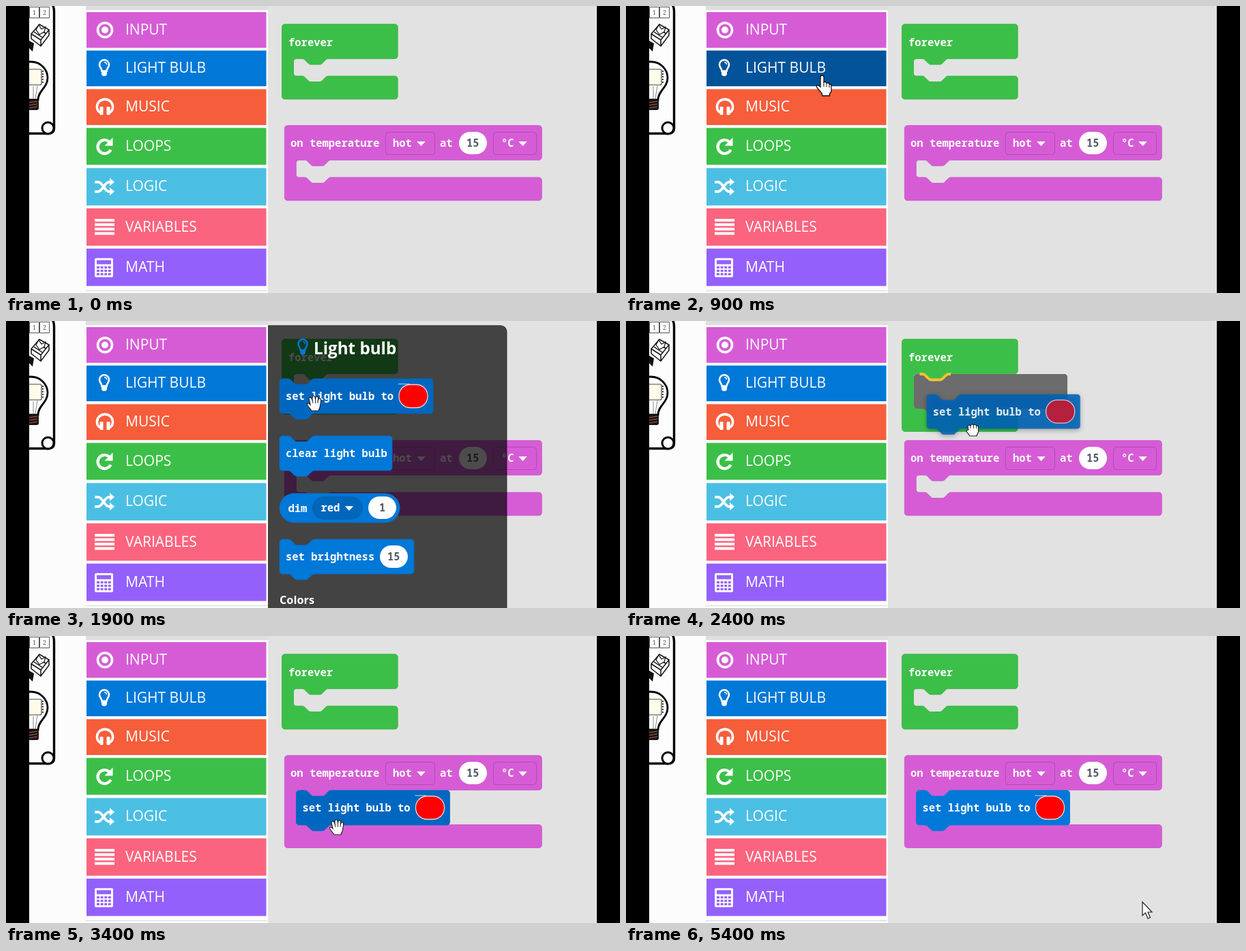
These frames come from a looping animation (900 px wide and 422 px high, 6500 ms). An HTML page with a canvas:

```html
<!DOCTYPE html>
<html lang="en">
<head>
<meta charset="utf-8">
<title>Block editor</title>
<style>
html, body { margin: 0; width: 100%; height: 100%; overflow: hidden; background: #000; }
canvas { display: block; width: 900px; height: 422px; }
</style>
</head>
<body>
<canvas id="stage" width="900" height="422"></canvas>
<script>
const ctx = document.getElementById('stage').getContext('2d');
const LOOP = 6500, STEP = 100, UNIT = 1.06;
const SANS = '"Open Sans", "Noto Sans", sans-serif';
const MONO = 'bold 15.5px "Noto Sans Mono", "DejaVu Sans Mono", monospace';
const BLUE = '#0078d7', ACTIVE_BLUE = '#0067c0', BLUE_EDGE = '#0a6cc4';
const GREEN = '#3cbf48', PURPLE = '#d65cd6', WORKSPACE = '#e2e2e2';

const rows = [
  ['INPUT', PURPLE, 9, 52.5], ['LIGHT BULB', BLUE, 65.5, 52.5], ['MUSIC', '#f65d3b', 122.3, 52.7],
  ['LOOPS', GREEN, 179.3, 54.2], ['LOGIC', '#4bbfe3', 238.3, 55],
  ['VARIABLES', '#fb647e', 297.5, 55], ['MATH', '#9460fb', 356.7, 55]
];

// Keys are [time, x, y].
const pointerKeys = [
  [100, 786, 397], [300, 745, 315], [500, 685, 200], [700, 612, 122], [800, 425, 110], [900, 290, 115],
  [1500, 290, 115], [1600, 318, 116], [1900, 452, 121], [2200, 452, 121], [2300, 466, 131],
  [2400, 508, 160], [2600, 510, 205], [2800, 496, 264], [2900, 491, 278], [3100, 485, 281],
  [3700, 485, 281], [3900, 560, 312], [4100, 700, 373], [4300, 757, 391]
];
const dragKeys = [
  [2300, 411, 92], [2400, 440.7, 107.7], [2600, 468, 154], [2800, 457, 214], [2900, 453.7, 227.3], [3100, 446, 230]
];

function at(keys, t) {
  if (t <= keys[0][0]) return keys[0].slice(1);
  for (let i = 1; i < keys.length; i++) {
    const [t0, x0, y0] = keys[i - 1], [t1, x1, y1] = keys[i];
    if (t <= t1) {
      const k = (t - t0) / (t1 - t0);
      return [x0 + (x1 - x0) * k, y0 + (y1 - y0) * k];
    }
  }
  return keys[keys.length - 1].slice(1);
}

function rect(x, y, w, h, color) {
  ctx.fillStyle = color;
  ctx.fillRect(x, y, w, h);
}

function rounded(x, y, w, h, r, fill, line, width = 1) {
  ctx.beginPath();
  ctx.roundRect(x, y, w, h, r);
  paint(fill, line, width);
}

function paint(fill, line, width = 1, path) {
  if (fill) { ctx.fillStyle = fill; path ? ctx.fill(path) : ctx.fill(); }
  if (line) {
    ctx.strokeStyle = line;
    ctx.lineWidth = width;
    path ? ctx.stroke(path) : ctx.stroke();
  }
}

function shape(x, y, d, fill, line, width, scale = 1) {
  ctx.save();
  ctx.translate(x, y);
  ctx.scale(scale, scale);
  paint(fill, line, width, new Path2D(d));
  ctx.restore();
}

function text(str, x, y, font = MONO, color = '#fff') {
  ctx.font = font;
  ctx.fillStyle = color;
  ctx.fillText(str, x, y);
}

// Block outlines, in editor units.
const NOTCH = 'c2,0 3,1 4,2 l4,4 c1,1 2,2 4,2 h12 c2,0 3,-1 4,-2 l4,-4 c1,-1 2,-2 4,-2 ';
const TAB = 'c-2,0 -3,1 -4,2 l-4,4 c-1,1 -2,2 -4,2 h-12 c-2,0 -3,-1 -4,-2 l-4,-4 c-1,-1 -2,-2 -4,-2 ';
const arc = (dx, dy, sweep = 1) => `a4,4 0 0 ${sweep} ${dx},${dy} `;

function statement(x, y, width, fill, line) {
  const w = width / UNIT;
  shape(x, y, 'M0,4 ' + arc(4, -4) + 'H12 ' + NOTCH + `H${w - 4} ` + arc(4, 4) + 'V44 ' + arc(-4, 4) +
    'H48 ' + TAB + 'H4 ' + arc(-4, -4) + 'z', fill, line, .8, UNIT);
}

function container(x, y, width, open, fill, line) {
  const w = width / UNIT, foot = open ? 96 : 72;
  shape(x, y, 'M0,4 ' + arc(4, -4) + `H${w - 4} ` + arc(4, 4) + 'V44 ' + arc(-4, 4) + 'H64 ' + TAB +
    'H20 ' + arc(-4, 4, 0) + `V${foot - 4} ` + arc(4, 4, 0) + 'H28 ' + NOTCH + `H${w - 4} ` + arc(4, 4) +
    `V${foot + 28} ` + arc(-4, 4) + 'H4 ' + arc(-4, -4) + 'z', fill, line, .8, UNIT);
}

function dropdown(x, y, w, label, labelX, arrowX, line, r = 4, fill = null) {
  rounded(x + .5, y + .5, w, 33, r, fill, line);
  text(label, labelX, y + 21.5);
  shape(arrowX, y + 15, 'M-4.5,0 H4.5 L0,5 z', '#fff', '#fff', 1.5);
}

function numberField(x, y, value, labelX) {
  rounded(x, y, 41, 33, 16.5, '#fff');
  text(value, labelX, y + 21.5, MONO, '#575e68');
}

function bulbLabel(x, y, swatch) {
  text('set light bulb to', x + 9, y + 31);
  rounded(x + 175, y + 8.5, 42, 34, 16.5, swatch, '#e6d5dc', 1.3);
}

function bulbBlock(x, y, fill) {
  statement(x, y, 225, fill, fill);
  bulbLabel(x, y, '#f00');
  rect(x + 174, y + 7, 17, 1.2, '#9cc4e6');
}

function draggedBlock(x, y) {
  ctx.save();
  ctx.globalAlpha = .88;
  ctx.shadowColor = 'rgba(0,0,0,.35)';
  ctx.shadowBlur = 7;
  ctx.shadowOffsetY = 2;
  statement(x, y, 225, '#0063b8');
  ctx.shadowColor = 'transparent';
  bulbLabel(x, y, '#cc162c');
  ctx.restore();
}

function placeholder(x, y) {
  statement(x, y, 225, '#6c6c6c');
  shape(x, y, 'M8,0 H12 ' + NOTCH + 'H51', null, '#f8c230', 3.6, UNIT);
}

function bulbIcon(x, y, color, scale = 1) {
  shape(x, y, 'M-3.5,5 C-3.5,1 -7,0 -7,-4.5 A7,7 0 0 1 7,-4.5 C7,0 3.5,1 3.5,5 z', null, color, 2.6, scale);
  shape(x, y, 'M-4,4 H4 V9 Q4,12 0,12.5 Q-4,12 -4,9 z', color, null, 1, scale);
  shape(x, y, 'M0,-8 Q3.5,-8 3.5,-4.5', null, color, 1.6, scale);
}

const icons = [
  y => {
    shape(145, y, 'M-10.5,0 a10.5,10.5 0 1 0 21,0 a10.5,10.5 0 1 0 -21,0', null, '#fff', 3.6);
    shape(145, y, 'M-5,0 a5,5 0 1 0 10,0 a5,5 0 1 0 -10,0', '#fff');
  },
  y => bulbIcon(144, y - 1, '#fff'),
  y => {
    shape(145, y, 'M-7,8 Q-12,5 -11.5,-1 A11.5,10.5 0 0 1 11.5,-1 Q12,5 7,8', null, '#fff', 3.6);
    shape(145, y, 'M-7,0 h4 v11 h-4 z M3,0 h4 v11 h-4 z', '#fff', '#fff', 1);
  },
  y => {
    shape(144, y, 'M7,-7 A10,10 0 1 0 9.5,5', null, '#fff', 4.2);
    shape(144, y, 'M12.5,-13 V-1 H.5 z', '#fff');
  },
  y => {
    shape(144, y, 'M-14,-7 H-9 C-2,-7 0,7 7,7 H10 M-14,7 H-9 C-2,7 0,-7 7,-7 H10', null, '#fff', 3.8);
    shape(144, y, 'M8,-13 L15,-7 L8,-1 z M8,1 L15,7 L8,13 z', '#fff');
  },
  y => { for (let i = 0; i < 4; i++) rect(130, y - 12 + i * 6.5, 29, 4, '#fff'); },
  (y, color) => {
    rounded(130, y - 13.5, 27, 28, 2, '#fff');
    rect(133, y - 10.5, 21, 6, color);
    for (let i = 0; i < 12; i++) rect(133 + i % 4 * 5.6, y - 1.5 + (i >> 2) * 5, 4, 3.2, color);
  }
];

function card() {
  ctx.save();
  ctx.beginPath();
  ctx.rect(34, 0, 45, 200);
  ctx.clip();
  shape(0, 0, 'M30,-5 H66 Q70.5,0 70.5,8 V180 Q70.5,187 62,187.5 H30', '#fdfdfd', '#000', 3.4);
  shape(61.5, 179.5, 'M-8.5,0 a8.5,8.5 0 1 0 17,0 a8.5,8.5 0 1 0 -17,0', '#fff', '#000', 3);
  for (const [n, x] of [['1', 34.5], ['2', 49.5]]) {
    rounded(x, 1.5, 14, 16, 0, '#fff', '#555');
    text(n, x + 4.5, 13, '9px "Noto Serif", serif', '#555');
  }
  shape(0, 0, 'M37,41 L49,27 L63,35 L51,50 z M37,41 V48 L51,59 L63,43 V35 M51,50 V59 M41,38 L53,46 M45,33 L58,40', '#fff', '#111', 1.5);
  shape(0, 0, 'M44,35 l4,-7 4,6 6,-3 -2,7 -7,4 z', '#fff', '#111', 1.2);
  shape(0, 0, 'M34,51 L41,55 L39,67 L34,62 z', '#111');
  shape(0, 0, 'M47,138 C47,124 61,121 61,105 A24,24 0 0 0 37,82 H30 V138 z', '#fff', '#000', 2.8);
  rounded(30, 93, 22, 23, 2, '#fffbea', '#444', 1.2);
  for (let i = 0; i < 5; i++) rect(53, 95 + i * 4, 2, 2, '#444');
  shape(0, 0, 'M40,118 V136 M46,117 L43,136', null, '#888', 1);
  rounded(30, 138, 18, 15, 3, '#171717');
  for (let i = 0; i < 3; i++) shape(34, 142 + i * 4, 'M0,0 L12,-2', null, '#b85a45', 1.1);
  ctx.restore();
}

function toolbox(hover) {
  rect(117, 0, 267, 6, '#dedede');
  rect(117, 6, 267, 416, '#fcfcfc');
  rect(117, 418, 266, 1.2, '#d9d9e4');
  rows.forEach(([label, color, y, h], i) => {
    rect(118, y, 263.5, h, hover && i === 1 ? '#02539a' : color);
    icons[i](y + h / 2, color);
    text(label, 175, y + h / 2 + 6.5, '500 21px ' + SANS);
  });
}

function forever(open) {
  container(404.5, 26.7, 169.7, open, GREEN, '#38b344');
  text('forever', 414, 58.5);
}

function temperature(open) {
  container(408.3, 175.7, 377, open, PURPLE, '#c956c9');
  text('on temperature', 417, 206.5);
  dropdown(556, 185, 72, 'hot', 567, 608.5, '#b14bb1');
  text('at', 636, 206.5);
  numberField(664, 185, '15', 675);
  dropdown(714, 185, 63, '°C', 726, 757.5, '#b14bb1');
}

function flyout() {
  rounded(384.5, 6.7, 349.5, 425, [0, 9, 0, 0], 'rgba(0,0,0,.7)', 'rgba(0,0,0,.6)');
  bulbIcon(435, 38, BLUE, .95);
  text('Light bulb', 451, 49, 'bold 24.2px ' + SANS);
  bulbBlock(401, 85, ACTIVE_BLUE);
  statement(401, 169, 165, BLUE, BLUE_EDGE);
  text('clear light bulb', 410, 200);
  rounded(401, 253.7, 176, 42.5, 21, BLUE, BLUE_EDGE);
  text('dim', 413.5, 280.5);
  dropdown(449, 258, 73, 'red', 461.5, 503, '#0a62b0', 16.5, '#0067bb');
  numberField(531, 258, '1', 547);
  statement(401, 321, 197, BLUE, BLUE_EDGE);
  text('set brightness', 410, 351.5);
  numberField(548, 330, '15', 559);
  text('Colors', 401, 416, 'bold 16.3px ' + SANS);
}

const cursors = {
  arrow: (x, y) => shape(x, y, 'M0,0 V20 L4.5,16 L8,24.5 L11.5,23 L8,15 H14 z', '#fff', '#222', 1.2),
  point: (x, y) => {
    shape(x, y, 'M-5,-10 Q-5,-13 -2.5,-13 Q0,-13 0,-10 V-3 Q2.5,-4.5 4,-1.5 Q7,-3 8,0 Q11,-.5 11,3 V9 Q11,12 8.5,14 V17 H-2.5 V14 L-10,5 Q-12,2 -9,1.5 Q-7,1.5 -5,4 z',
      '#fff', '#111', 1.3);
    shape(x, y, 'M0,-3 V4 M4,-1 V4 M8,0 V5', null, '#111', 1);
  },
  hand: (x, y) => {
    shape(x, y, 'M-6,2 L-8,-6 Q-8,-8.5 -6,-8.5 Q-4.5,-8.5 -3,-5 Q-3.5,-11 -1,-11 Q1,-11 1.5,-6 Q2,-10.5 4,-10 Q6,-9.5 5.5,-5 Q7,-8 8.5,-7 Q10,-6 9.5,-2 L8,6 Q7,8 6,11 H-4 L-10,3 Q-11.5,0 -9,0 Q-8,0 -6,2 z',
      '#fff', '#222', 1.2);
    shape(x, y, 'M-3,-5 L-2,0 M1.5,-6 V0 M5.5,-5 L5,0', null, '#222', .9);
  },
  grab: (x, y) => {
    shape(x, y, 'M-6,0 L-7,-5 Q-6,-8 -3,-6 Q-1,-9.5 1.5,-7 Q4,-9 5.5,-6 Q8.5,-7 8.5,-3 V3 Q7,6 6,9 H-4 L-8.5,3 Q-9.5,0 -6,0 z',
      '#fff', '#222', 1.2);
    shape(x, y, 'M-3,-6 V-2 M1.5,-7 V-2 M5.5,-6 V-2', null, '#222', .9);
  }
};

function pointerKind(t) {
  if (t < 900) return 'arrow';
  if (t < 1700) return 'point';
  if (t < 2300) return 'hand';
  if (t < 3300) return 'grab';
  return t < 3900 ? 'hand' : 'arrow';
}

function draw(t) {
  const dragging = t >= 2300 && t < 3300;
  const dropped = t >= 3300;
  const overForever = t >= 2400 && t < 2600;
  const overTemperature = dragging && t >= 2700;

  rect(0, 0, 900, 422, '#000');
  rect(34, 0, 832, 422, '#fcfcfc');
  rect(383, 0, 483, 422, WORKSPACE);
  card();
  toolbox(t >= 900 && t < 1300);

  forever(overForever);
  if (overForever) placeholder(422, 78);
  temperature(overTemperature || dropped);
  if (overTemperature) placeholder(425.5, 227);
  if (dropped) bulbBlock(425.5, 227, t < 4800 ? ACTIVE_BLUE : BLUE);
  if (t >= 1300 && t < 2300) flyout();
  if (dragging) draggedBlock(...at(dragKeys, t));
  if (t >= 100) cursors[pointerKind(t)](...at(pointerKeys, t));
}

const start = performance.now();
function frame() {
  const t = (performance.now() - start) % LOOP;
  draw(Math.floor(t / STEP) * STEP);
  requestAnimationFrame(frame);
}
frame();
</script>
</body>
</html>
```
